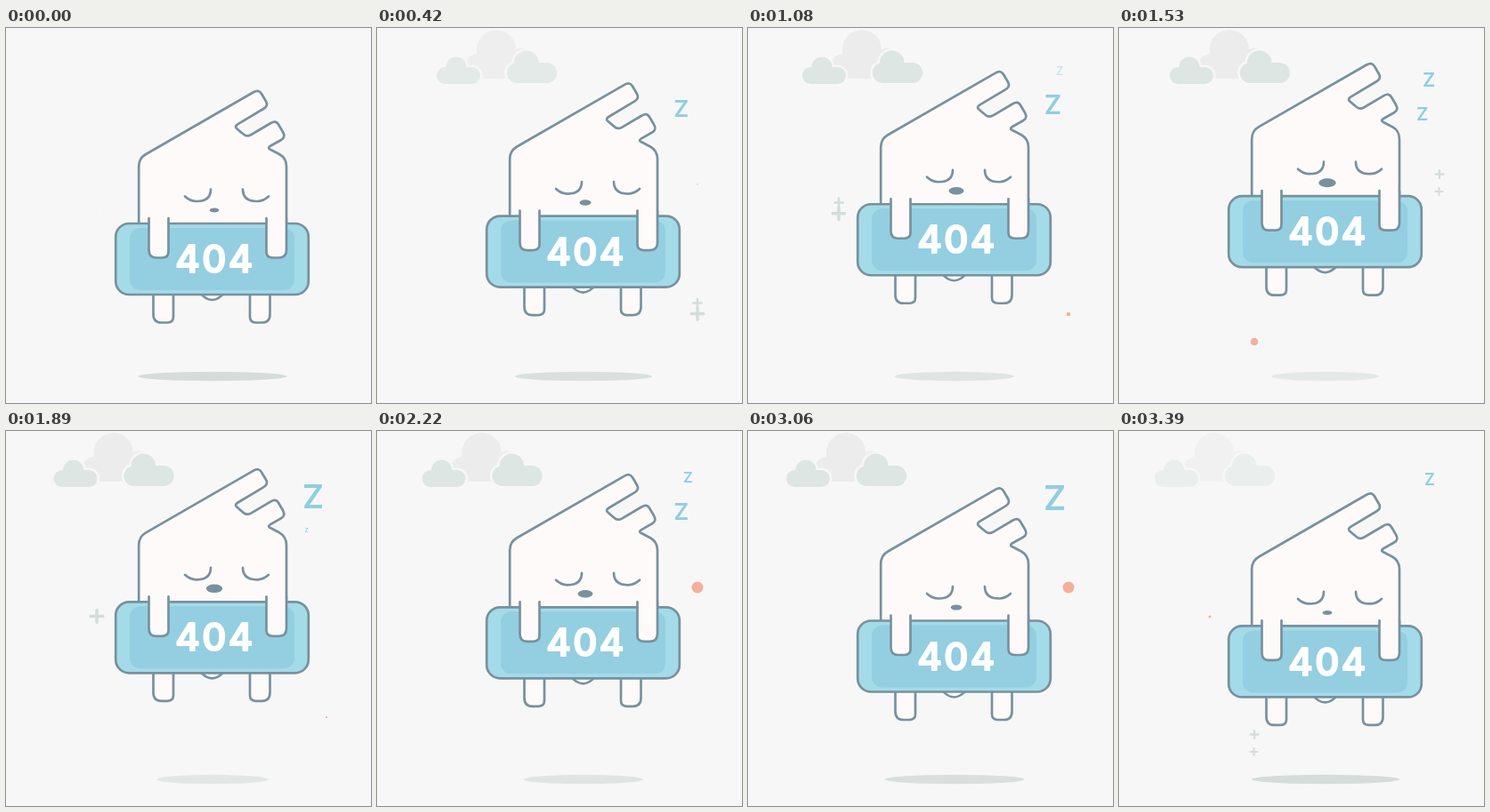
An HTML page that plays this animation: 410x422 px, repeating every 3.42 s.

```html
<!DOCTYPE html>
<html lang="en">
<head>
<meta charset="utf-8">
<title>404</title>
<style>
  html, body { margin: 0; width: 100%; height: 100%; overflow: hidden; background: #f7f7f7; }
  svg { display: block; width: 410px; height: 422px; }
  text { font-family: Inter, sans-serif; text-anchor: middle; }
  .skin { fill: #fefafa; }
  .line { stroke: #78919e; stroke-width: 2.7; stroke-linecap: round; stroke-linejoin: round; }
  .front { fill: #dee6e3; stroke: #f7f7f7; stroke-width: 5; paint-order: stroke; }
</style>
</head>
<body>
<svg viewBox="0 0 410 422">
  <g id="clouds">
    <path fill="#ececec" d="M108 57a13 13 0 0 1-2-28V24a22 22 0 0 1 44 0a14 14 0 0 1 20 15V57z"/>
    <path class="front" d="M70.500 63a9.500 9.500 0 0 1 0-19h1a11.500 11.500 0 0 1 23 0h6a9.500 9.500 0 0 1 0 19z"/>
    <path class="front" d="M150.500 62a11.500 11.500 0 0 1-2.500-22.500a13.800 13.800 0 0 1 27.600-.5h9a11.500 11.500 0 0 1 0 23z"/>
  </g>
  <ellipse id="shadow" cx="232" cy="392" ry="5.200" fill="#d5dddb"/>
  <g id="sleeper">
    <g class="skin line">
      <path d="M165.500 290V322q0 9.500 9 9.500h7q6.500 0 6.500-6.500V290M274 290V325q0 6.500 6.500 6.500h7q9 0 9-9.500V290"/>
      <path d="M216 296q15.500 20 31 0"/>
      <path d="M149.200 232V156q0-9.500 8-14L278 72.300q6-3.500 9 1.700l5 8.500q3 5-2.500 8.300L260.500 108.200q-4 2.400-1.500 4.800Q264 117.500 267 119.800q3.500 2.800 8 .5L297.500 107q5.500-3.500 8.500 1.500l5 8.500q3.500 6-2 9L297 132.800q-3.500 2-.5 3.700L307 142q8 4.500 8 14V232"/>
    </g>
    <g class="line" fill="none">
      <path d="M201 189.500q6 5.500 13 5.500c9 0 16-3.500 16-13.500M295 189.500q-6 5.500-13 5.500c-9 0-16-3.500-16-13.500"/>
    </g>
    <ellipse id="nose" cx="234" cy="205" fill="#78919e"/>
    <rect class="line" x="123.200" y="220" width="216.600" height="80" rx="15" fill="#a4dbe9"/>
    <rect x="139" y="225" width="185" height="70" rx="12" fill="#94cee1"/>
    <path class="skin line" d="M160.500 214V250q0 8.500 8 8.500h7q7 0 7-6.500V214M292.500 214V252q0 6.500 7 6.500h7q8.500 0 8.500-8.500V214"/>
    <text x="235" y="275.200" font-size="42" font-weight="500" letter-spacing="2.500" fill="#fff" stroke="#fff" stroke-width="2.200" stroke-linejoin="round">404</text>
  </g>
  <g id="sparks"></g>
  <g id="snores" font-weight="600" fill="#8fcee1"></g>
</svg>
<script>
const LOOP = 3420, PEAK = 1620, LIFT = 32.6;
const [clouds, shadow, sleeper, nose, sparks, snores] =
  ['clouds', 'shadow', 'sleeper', 'nose', 'sparks', 'snores'].map(id => document.getElementById(id));
const spots = [
  { x: 102, y: 209, delay: -10 },
  { x: 360, y: 322, delay: 180 },
  { x: 360, y: 176, delay: 400 },
  { x: 152, y: 353, delay: 590 }
];
const clamp = (v, lo = 0, hi = 1) => Math.min(hi, Math.max(lo, v));

function plus(x, y, size) {
  const arm = size * 0.4;
  return `<path d="M${x - arm} ${y}h${2 * arm}M${x} ${y - arm}v${2 * arm}"
    stroke="#d5dddb" stroke-width="${size * 0.21}" stroke-linecap="round"/>`;
}

// A dot swells, then pops into a pair of crosses that drift apart.
function spark({ x, y, delay }, time) {
  const age = (time - delay) % 840;
  if (time < delay || age > 350) return '';
  if (age < 215) {
    const radius = Math.min(7, age * (0.032 + age * 0.0001));
    return `<circle cx="${x}" cy="${y}" r="${radius}" fill="#f4b09b"/>`;
  }
  const split = clamp((age - 250) / 25);
  const lower = plus(x - split / 2, y - 0.5 + 8.5 * split, 17 - 7 * split);
  return age < 232 ? lower : lower + plus(x, y - 12.5 + split, 12 - split);
}

function snore(age) {
  if (age < 0 || age > 1120) return '';
  const size = Math.min(age, 1285 - age) * 0.062;
  const x = 336.4 + 0.0126 * age, y = 117.3 - 0.0638 * age + size * 0.364;
  return `<text x="${x}" y="${y}" font-size="${size}" opacity="${clamp((1120 - age) / 90)}">Z</text>`;
}

function draw(time) {
  const rise = LIFT * (time < PEAK ? time / PEAK : (LOOP - time) / (LOOP - PEAK));
  sleeper.setAttribute('transform', `translate(0 ${-rise})`);
  nose.setAttribute('rx', 5.3 + 0.14 * rise);
  nose.setAttribute('ry', 2.5 + 0.08 * rise);
  shadow.setAttribute('rx', 83.5 - 0.75 * rise);
  shadow.setAttribute('opacity', 1 - 0.015 * rise);
  clouds.setAttribute('transform', `translate(${9.8 - 0.0091 * time} 0)`);
  clouds.setAttribute('opacity', clamp(Math.min(time / 560, (3600 - time) / 420)));
  sparks.innerHTML = spots.map(s => spark(s, time)).join('');
  snores.innerHTML = [0, 600, 1200, 1800, 2400].map(start => snore(time - start)).join('');
}

function tick() {
  draw(performance.now() % LOOP);
  requestAnimationFrame(tick);
}
tick();
</script>
</body>
</html>
```
